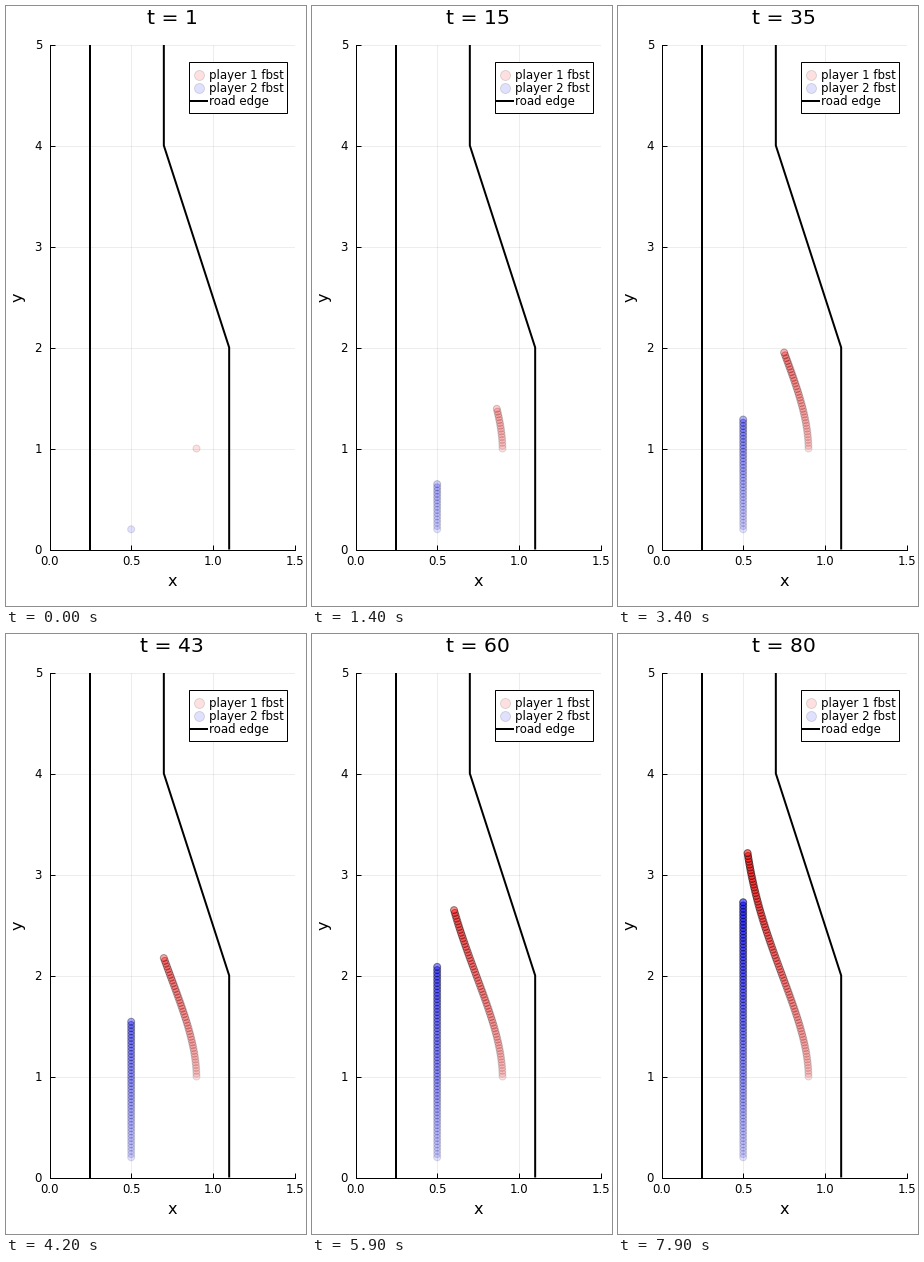
Recreate the animation shown at these times as a matplotlib script. Size 300 by 600 pixels, loop 8 s.

```python
import matplotlib.pyplot as plt
import numpy as np
from matplotlib.animation import FuncAnimation
from matplotlib.patches import Rectangle

W, H, DPI = 300, 600, 100
STEPS = 80
PX = 72 / DPI  # points per pixel
TICK, LABEL, TITLE = 11.75 * PX, 16.1 * PX, 20.4 * PX

plt.rcParams["font.family"] = "DejaVu Sans"
fig = plt.figure(figsize=(W / DPI, H / DPI), dpi=DPI, facecolor="white")


def text(x, y, s, size, **kw):
    kw = {"ha": "center", "va": "baseline", **kw}
    return fig.text(x / W, 1 - y / H, s, fontsize=size, **kw)


# Trajectories: steady straight drive and a smooth merge to the left
steps = np.arange(STEPS)
knots = [0, 14, 34, 42, 59, 70, 79]
merge_x = np.polyfit(knots, [0.9, 0.865, 0.751, 0.700, 0.603, 0.556, 0.527], 4)
merge_y = np.polyfit(knots, [1.0, 1.392, 1.951, 2.172, 2.648, 2.955, 3.212], 3)
path1 = np.column_stack([np.polyval(merge_x, steps), np.polyval(merge_y, steps)])
path2 = np.column_stack([np.full(STEPS, 0.5), 0.2 + 0.03196 * steps])
alpha = 0.12 + 0.43 * steps / (STEPS - 1)


def rgba(color):
    out = np.zeros((STEPS, 4))
    out[:, :3] = color
    out[:, 3] = alpha
    return out


RED, BLUE, BLACK = (1, 0, 0), (0, 0, 1), (0, 0, 0)

# Plot area
ax = fig.add_axes([43.5 / W, 1 - 543.5 / H, 245 / W, 505 / H])
ax.set(xlim=(0, 1.5), ylim=(0, 5), xticks=[0, 0.5, 1, 1.5], yticks=range(6))
ax.set_axisbelow(True)
ax.grid(color="black", alpha=0.1, lw=0.5)
ax.spines[["top", "right"]].set_visible(False)
ax.spines[["left", "bottom"]].set_linewidth(PX)
ax.tick_params(direction="in", length=5 * PX, width=PX,
               labelbottom=False, labelleft=False)

for v in (0, 0.5, 1, 1.5):
    text(43.5 + v / 1.5 * 245, 559, f"{v:.1f}", TICK)
for v in range(6):
    text(36, 548 - 101 * v, str(v), TICK, ha="right")
text(166, 580, "x", LABEL)
text(12, 291, "y", LABEL, rotation=90, va="center")
title = text(166, 18, "", TITLE)

road = dict(color="black", lw=2 * PX, solid_capstyle="butt")
ax.plot([0.25, 0.25], [0, 5], **road)
ax.plot([1.1, 1.1, 0.7, 0.7], [0, 2, 4, 5], **road)


def trail(path, color):
    return ax.scatter(*path.T, s=(7 * PX) ** 2, facecolors=rgba(color),
                      edgecolors=rgba(BLACK), linewidths=PX, zorder=3)


trails = [(trail(path1, RED), path1), (trail(path2, BLUE), path2)]

# Legend, laid out in pixels
key = fig.add_axes([0, 0, 1, 1], facecolor="none")
key.set(xlim=(0, W), ylim=(H, 0))
key.axis("off")
key.add_patch(Rectangle((182.5, 55.5), 98, 51.5, fc="white", ec="black", lw=PX))
for y, color in ((68.5, RED), (81.5, BLUE)):
    key.scatter([193], [y], s=(10 * PX) ** 2, facecolors=[(*color, 0.12)],
                edgecolors=[(*BLACK, 0.12)], linewidths=PX, zorder=3)
key.plot([184, 202], [94.5, 94.5], **road)
for y, name in ((73, "player 1 fbst"), (86, "player 2 fbst"), (99, "road edge")):
    key.text(203, y, name, fontsize=TICK, ha="left", va="baseline")


def update(i):
    title.set_text(f"t = {i + 1}")
    for dots, path in trails:
        dots.set_offsets(path[:i + 1])
    return [title] + [dots for dots, _ in trails]


anim = FuncAnimation(fig, update, frames=STEPS, interval=100,
                     repeat=True, repeat_delay=0, blit=False)
plt.show()
```
